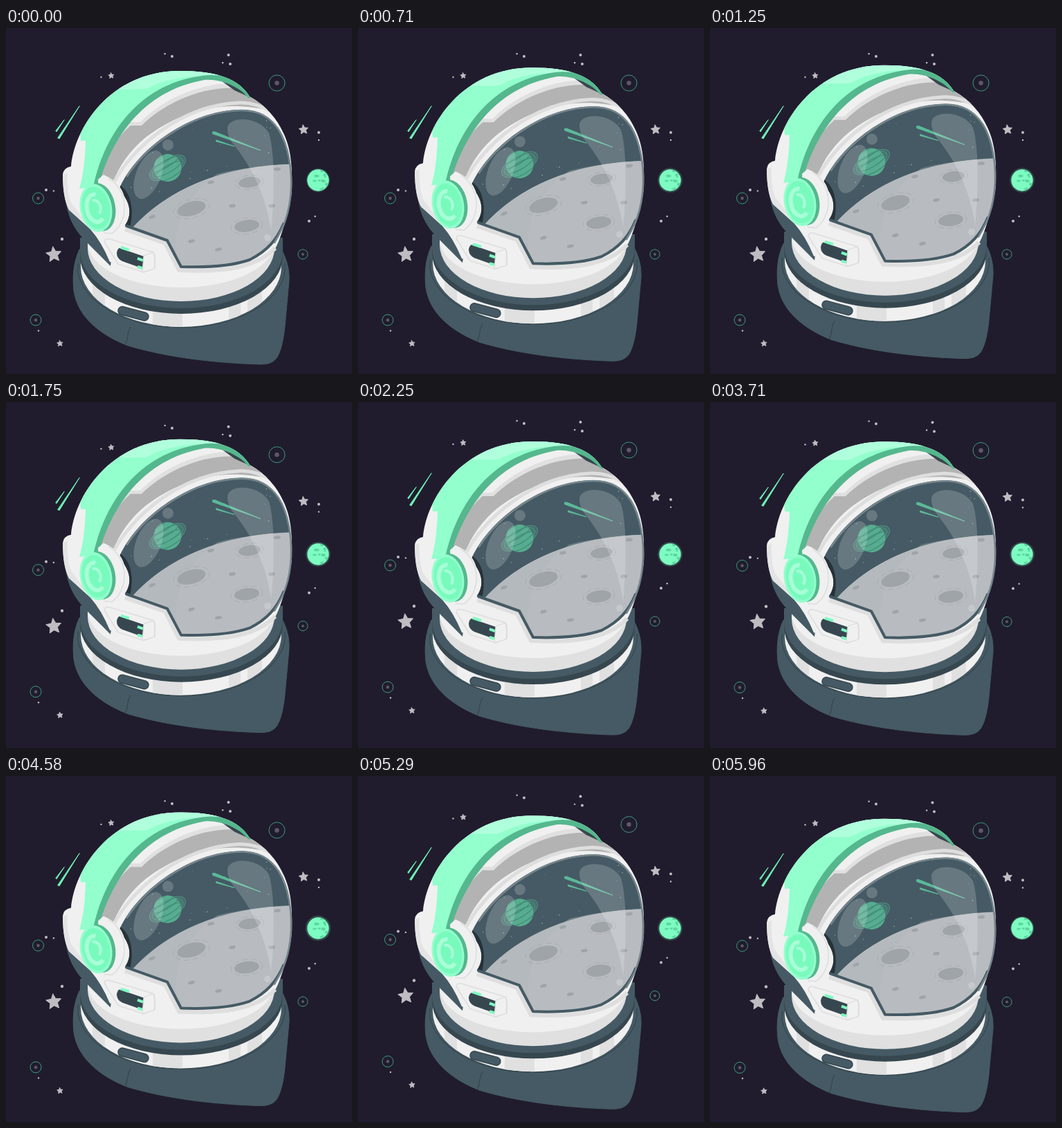
Recreate the animation shown at these times as an HTML page. Size 500x500 px, loop 6000 ms.

```html
<!DOCTYPE html>
<html lang="en">
<head>
<meta charset="utf-8">
<title>Space helmet</title>
<style>
html, body { margin: 0; width: 100%; height: 100%; overflow: hidden; background: #201c2d; }
svg { display: block; width: 100%; height: 100%; }
.white { fill: #f0f0f0 } .grey { fill: #e0e0e0 } .slate { fill: #455a64 } .dark { fill: #37474f }
.mint { fill: #92ffcd } .edge { fill: #55b78d }
.line { fill: none; stroke: #37474f; stroke-width: 1.3 }
.soft { fill: none; stroke: #dedede; stroke-width: 1.6 }
.round { stroke-linejoin: round; stroke-linecap: round }
</style>
</head>
<body>
<svg viewBox="0 0 500 500">
  <defs>
    <path id="glass" d="M163 234C185 180 260 119 340 118C365 118 382 128 394 146C409 170 414 205 413 232C411 275 392 313 352 335C320 346 280 346 253 345L233 307L172 285C183 270 180 250 163 234Z"/>
    <path id="shell" d="M82 212Q83 202 94 200C99 145 150 62 252 62C305 62 337 74 352 99C376 112 392 132 401 152C412 175 414 200 413 235C405 285 393 312 389 319C383 345 310 358 250 355L150 338Q138 309 122 291L91 263Q82 246 82 212Z"/>
    <clipPath id="inGlass"><use href="#glass"/></clipPath>
    <clipPath id="inShell"><use href="#shell"/></clipPath>
    <clipPath id="inBand"><path d="M108 300V345A145 87 0 0 0 398 345V300Z"/></clipPath>
    <clipPath id="inGlobe"><circle cx="451" cy="220" r="15.7"/></clipPath>
    <clipPath id="inPlanet"><circle r="20"/></clipPath>
  </defs>

  <g id="sky"></g>
  <g fill="#7dfcc1">
    <circle id="halo" cx="451" cy="220" r="18" opacity=".2"/>
    <circle cx="451" cy="220" r="15.7"/>
    <g id="land" clip-path="url(#inGlobe)" fill="#4dc08f" opacity=".65"></g>
  </g>

  <g id="helmet">
    <!-- suit and neck -->
    <path class="slate" stroke="#455a64" d="M106 320C97 340 96 360 98 380C104 420 140 445 176 459C240 478 310 484 365 486Q384 487 391 477Q401 462 404 420L409 366C410 348 405 333 398 320Z"/>
    <path class="line" d="M104 340V352A150 88 0 0 0 403 352V340M180 432C174 442 177 450 172 458"/>
    <g id="neck"></g>

    <!-- shell -->
    <path class="slate" d="M86 245C88 275 101 294 115 308L151 344L154 320L110 255Z"/>
    <use href="#shell" class="white"/>
    <path class="grey" opacity=".7" d="M89 209Q88 237 94 252L122 289L91 263Q82 246 82 212Z"/>
    <path class="soft" style="stroke-width:6" d="M172 291L230 311L250 350C305 353 360 349 389 318"/>

    <!-- crest and bands -->
    <g clip-path="url(#inShell)">
      <path class="grey" d="M133 218C139 185 155 157 179 136H194C222 108 269 82 322 80L390 120C290 94 235 114 195 143Z"/>
      <path fill="#b3b3b3" d="M135 222C142 188 157 161 180 141H196C225 112 278 84 333 87L385 120C304 100 245 126 202 158Q169 185 154 224Z"/>
      <path class="soft" style="stroke-width:5" d="M155 225C180 176 249 112 337 108Q361 107 385 122"/>
      <path class="mint" d="M108 163L100 60H340L352 100C336 83 313 70 287 72C190 92 145 165 132 230L106 232Q114 205 115 163Z"/>
      <path fill="#b0ffdc" d="M163 88L180 60H300L311 71C270 66 230 73 203 88Q178 89 163 88Z"/>
      <path class="dark" d="M308 74Q336 80 352 100L330 90Z"/>
      <path class="edge" d="M126 231C140 160 187 82 283 69C318 64 348 78 354 101L350 101C338 85 310 73 287 75C195 91 151 163 133 231Z"/>
    </g>

    <!-- visor -->
    <use href="#glass" class="slate"/>
    <g clip-path="url(#inGlass)">
      <g id="specks" fill="#a9bbb9"></g>
      <g id="ringed" transform="translate(233.5 202) rotate(-30)"></g>
      <g fill="#5cb998" stroke="#5cb998" class="round">
        <path d="M299 150L302 150L368 177L299 153ZM304 162L330 171L304 164Z"/>
      </g>
      <path d="M181 291C230 236 310 198 420 197V360H180Z" fill="#b4b9bd" stroke="#c0c5c8" stroke-width=".8"/>
      <path d="M252 345C235 305 250 250 305 211Q350 199 420 198V360Z" fill="#c0c4c7" opacity=".3"/>
      <g id="craters" fill="#9fa4a8"></g>
      <path fill="#263238" d="M160 224C184 237 185 267 178 293L163 284C171 268 173 250 160 239Z"/>
      <g fill="#fff" fill-opacity=".18">
        <path d="M320 144C323 126 367 128 380 152C389 180 388 250 383 293C377 248 358 205 331 171Q319 157 320 144Z"/>
        <circle cx="378" cy="303" r="5"/>
        <ellipse cx="206" cy="212" rx="18" ry="37" transform="rotate(22 206 212)"/>
        <circle cx="234" cy="169" r="8"/>
      </g>
    </g>
    <g fill="none" class="round">
      <path d="M174 286L233 307L253 345C280 346 320 346 352 335C378 322 392 305 401 283" stroke="#455a64" stroke-width="4"/>
      <path d="M175 214C205 168 270 120 340 119C365 119 381 128 394 147C409 171 413 205 412 232C410 270 400 290 388 310" stroke="#76858c" stroke-width="2.6"/>
    </g>

    <!-- ear piece -->
    <path class="white" d="M133 219L141 212L149 216Q173 230 173 259Q172 286 155 296L137 297Z"/>
    <path class="soft" d="M148 217C167 228 174 250 170 271Q165 289 153 297L141 296"/>
    <g transform="translate(130 260) rotate(-11)">
      <ellipse class="edge" cx="6" rx="22" ry="35"/>
      <ellipse class="mint" rx="23" ry="35"/>
      <ellipse rx="20" ry="31" fill="#79fabd"/>
      <path d="M3 -19A13 20 0 1 0 7 17" fill="none" stroke="#a8ffd8" stroke-width="6"/>
      <path d="M-3 -11A8 11 0 0 1 3 9" fill="none" stroke="#a8ffd8" stroke-width="4"/>
    </g>

    <!-- side module -->
    <path class="soft" d="M142 309Q143 303 150 305L213 324Q216 327 215 347L199 353L162 341Z"/>
    <path class="dark" d="M164 318L199 330V348L168 337Q160 333 160 325Q161 319 164 318Z"/>
    <path stroke="#7dfcc1" stroke-width="4" d="M166 317L178 321M190 333L198 336M190 345L197 347"/>
    <path class="white" stroke="#d9d9d9" d="M199 329L213 324Q216 333 214 348L197 353Z"/>
    <g class="round" fill="none">
      <path d="M168 408.5L200 417" stroke="#37474f" stroke-width="13.5"/>
      <path d="M168 408.5L200 417" stroke="#455a64" stroke-width="10.5"/>
    </g>
  </g>
</svg>
<script>
const $ = id => document.getElementById(id);
const fill = (id, parts) => $(id).innerHTML = [].concat(parts).join('');
const times = (n, make) => Array.from({ length: n }, (_, i) => make(i));
const oval = (x, y, rx, ry, extra = '') => `<ellipse cx="${x}" cy="${y}" rx="${rx}" ry="${ry}" ${extra}/>`;
const dot = (x, y, r, extra) => oval(x, y, r, r, extra);

let seed = 7;
const rnd = (a, b) => a + (b - a) * (seed = seed * 16807 % 2147483647) / 2147483647;

function star([x, y, r]) {
  const pts = times(10, i => {
    const a = i * Math.PI / 5 - .1, q = i % 2 ? r * .48 : r;
    return `${x + q * Math.sin(a)},${y - q * Math.cos(a)}`;
  });
  return `<polygon points="${pts.join(' ')}" stroke="#bfbdc2" class="round"/>`;
}

// Each dot has a smaller companion, turning with height
function pair([x, y]) {
  const a = (200 - (y - 41)) * Math.PI / 180;
  return dot(x, y, 2) + dot(x + 11 * Math.cos(a), y + 11 * Math.sin(a), 1.2);
}

const ring = ([x, y, r]) => dot(x, y, r, 'fill="none" stroke="#3d9c7d"') + dot(x, y, r * .28, 'fill="#5d5966"');

fill('sky', [
  '<g fill="#bfbdc2">',
  ...[[69, 327.5, 11.5], [152, 69, 4.2], [430, 147, 7], [78, 456, 4.4]].map(star),
  ...[[240, 41], [324, 52], [452, 151], [438, 279], [58, 234]].map(pair),
  dot(81, 305, 2.2), dot(321.5, 39, 2), dot(137.5, 71, 1.2), dot(47, 437.5, 1.2), '</g>',
  ...[[391.5, 79.5, 11.5], [46.5, 246, 8], [429, 327, 7], [43, 422, 8]].map(ring),
  '<path fill="#73f9bb" stroke="#73f9bb" class="round" d="M106 113L77 160L75 159ZM84 133L73 150L72 149Z"/>'
]);

fill('land', times(16, () => oval(rnd(436, 466), rnd(205, 235), rnd(1, 4), rnd(1, 2.5))));
fill('specks', times(30, () => dot(rnd(180, 400), rnd(130, 240), rnd(.3, .8))));

// Half-ellipse bowls stacked from the outside in
const bowl = (left, right, y, depth, name) =>
  `<path class="${name}" d="M${left} 303V${y}A${(right - left) / 2} ${depth} 0 0 0 ${right} ${y}V303Z"/>`;
fill('neck', [
  bowl(108, 398, 345, 87, 'white'),
  '<path clip-path="url(#inBand)" d="M125 380H400" stroke="#e0e0e0" stroke-width="130" stroke-dasharray="18 69 43 67 17 10 21 99"/>',
  bowl(107, 400, 330, 83, 'dark'),
  bowl(107, 400, 322, 83, 'slate'),
  bowl(118, 388, 318, 77, 'grey'),
  bowl(118, 388, 310, 65, 'white')
]);

// Thin hoops and stripes around the small planet
fill('ringed', [
  ...[29, 25].map(r => oval(0, 0, r, r * .45, 'fill="#4d9481" fill-opacity=".25" stroke="#4d9481"')),
  dot(0, 0, 20, 'fill="#57ac8f"'),
  '<g clip-path="url(#inPlanet)" fill="none" stroke="#438b79" stroke-width="1.3">',
  ...times(4, i => oval(0, 8 * i - 18, 26, 9)), '</g>'
]);

// Pits flatten and tilt towards the left
function crater([x, y, r]) {
  const place = `transform="translate(${x} ${y}) rotate(${(x - 420) / 10})"`;
  const rim = r > 10 ? oval(0, 0, r * 1.28, r * .64, 'fill="none" stroke="#a5aaae" stroke-width=".8" stroke-dasharray="8 5"') : '';
  return `<g ${place}>${rim}${oval(0, 0, r, r * .48)}</g>`;
}
const pits = [[327, 257], [384, 257], [268, 308], [211, 273], [296, 223], [392, 204], [307, 320]];
fill('craters', [[268, 261, 21], [352, 223, 16], [348, 286, 18], ...pits.map(p => [...p, 5])].map(crater));

// Linear 0 - 1 - 0 over one period
const swing = (t, period) => 1 - Math.abs(1 - 2 * (t % period) / period);
const lift = (id, y) => $(id).setAttribute('transform', `translate(0 ${-y})`);

const start = performance.now();
function draw(now) {
  const t = Math.max(0, now - start) % 6000;
  lift('helmet', 10 * swing(t, 3000));
  lift('sky', t < 1500 ? 0 : 10 * swing(t, 1500));
  $('halo').setAttribute('r', 17 + 1.5 * swing(t, 1000));
  requestAnimationFrame(draw);
}
draw(start);
</script>
</body>
</html>
```
